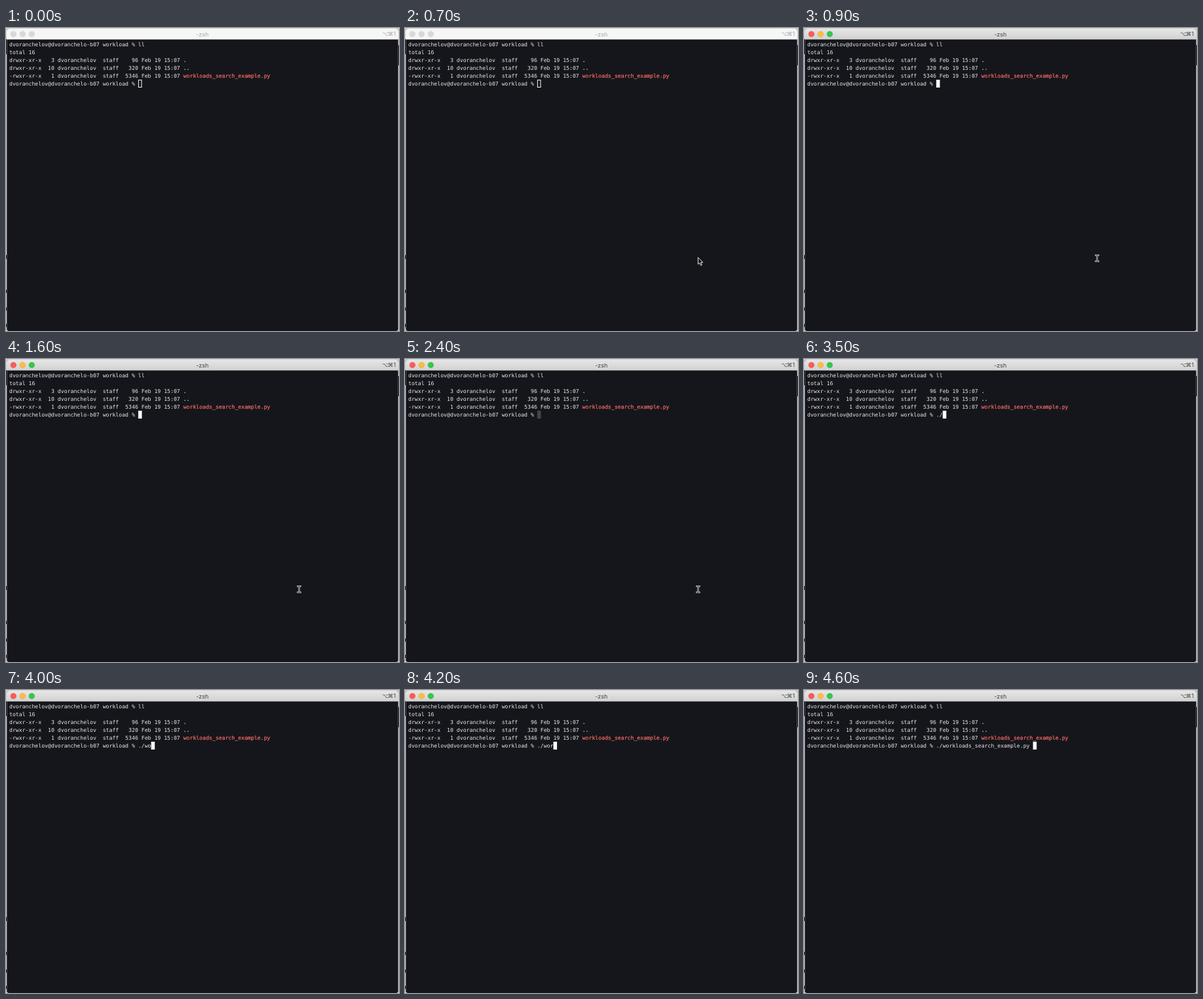
These frames come from a looping animation (600 by 463 pixels, 5000 ms). An HTML page:

```html
<!DOCTYPE html>
<html lang="en">
<head>
<meta charset="utf-8">
<title>Terminal</title>
<style>
html, body { margin: 0; width: 100%; height: 100%; overflow: hidden; background: #15161b; }
svg { display: block; width: 600px; height: 463px; }
text { white-space: pre; text-rendering: geometricPrecision; }
#lines text { font: 8.18px "DejaVu Sans Mono", monospace; fill: #e9e9ea; }
.bar { font: 9px Inter, sans-serif; text-anchor: middle; fill: #404040; }
.key { font: 8.3px "DejaVu Sans", sans-serif; }
.exe { fill: #f16a66; stroke: #f16a66; stroke-width: .22; }
.dir { fill: #a8e4e2; stroke: #a8e4e2; stroke-width: .22; }
.idle .bar { fill: #a6a6a6; }
.idle #lights circle { fill: #d9d9d9; stroke: #cacaca; }
.idle #title { fill: #f6f6f6; }
</style>
</head>
<body>
<svg id="stage" viewBox="0 0 600 463">
  <defs>
    <linearGradient id="chrome" x2="0" y2="1">
      <stop stop-color="#e6e6e6"/><stop offset="1" stop-color="#d1d1d1"/>
    </linearGradient>
  </defs>
  <rect width="600" height="463" fill="#d2d2d3"/>
  <g fill="#1b1b1d">
    <rect y="17" width="1" height="23"/>
    <rect x="599" y="26" width="1" height="31"/>
    <rect y="347" width="1" height="6"/>
    <rect y="400" width="1" height="5"/>
    <rect y="427" width="1" height="5"/>
    <rect y="452" width="1" height="5"/>
  </g>
  <rect x="1" y="1" width="598" height="462" rx="4" fill="#15161b"/>
  <path d="M1.5 17V460M598.5 17V460" stroke="#4b4c50"/>
  <path id="title" d="M1 17.5V5q0-4 4-4H595q4 0 4 4V17.5z" fill="url(#chrome)"/>
  <g id="lights" stroke-width=".5">
    <circle cx="11.3" cy="9.3" r="4.3" fill="#fc5b57" stroke="#df4744"/>
    <circle cx="25.3" cy="9.3" r="4.3" fill="#fdbc40" stroke="#de9f34"/>
    <circle cx="39.3" cy="9.3" r="4.3" fill="#34c84a" stroke="#27aa35"/>
  </g>
  <text class="bar" x="299.8" y="12.6">-zsh</text>
  <text class="bar key" x="579.2" y="12.2">⌥</text>
  <text class="bar key" x="587.2" y="12.2">⌘</text>
  <text class="bar" x="593.4" y="12.4">1</text>
  <g id="lines"></g>
  <rect id="cursor" y="79.5" width="4.6" height="11" stroke="#fff"/>
  <path id="arrow" d="M0 0V10.4L2.4 8.3 4.1 12.2 5.9 11.4 4.2 7.6H7.4z" fill="#111" stroke="#fff" stroke-width=".9"/>
  <g id="beam" fill="none" stroke-linecap="square">
    <path d="M445.4 347.2H449.6M447.5 347.2V356.6M445.4 356.6H449.6" stroke="#fff" stroke-width="2"/>
    <path d="M445.6 347.2H449.4M447.5 347.2V356.6M445.6 356.6H449.4" stroke="#15161b" stroke-width=".7"/>
  </g>
</svg>
<script>
const $ = id => document.getElementById(id);
const LOOP = 5000, LEFT = 5, CELL = 8.18 * 0.602;
const USER = 'dvoranchelov', SCRIPT = 'workloads_search_example.py';
const PROMPT = USER + '@dvoranchelo-b07 workload % ';
const COMMAND = './' + SCRIPT + ' ';

// Times at which the number of typed characters changes; the last is a tab completion.
const KEYS = [[3200, 1], [3500, 2], [3900, 3], [4000, 4], [4100, 5], [4300, 6], [4500, COMMAND.length]];
// Cursor opacity for each tenth of its one-second blink.
const BLINK = [0.97, 0.45, 0, 0, 0.2, 0.65, 1, 1, 1, 1];

function addLine(row, text, tail = '', kind = '') {
  const line = document.createElementNS('http://www.w3.org/2000/svg', 'text');
  line.setAttribute('x', LEFT);
  line.setAttribute('y', 27.7 + row * 12);
  line.innerHTML = `${text}<tspan class="${kind}">${tail}</tspan>`;
  $('lines').append(line);
  return line;
}

const entry = (mode, links, size) =>
  `${mode} ${String(links).padStart(3)} ${USER}  staff  ${String(size).padStart(4)} Feb 19 15:07 `;

addLine(0, PROMPT + 'll');
addLine(1, 'total 16');
addLine(2, entry('drwxr-xr-x', 3, 96), '.', 'dir');
addLine(3, entry('drwxr-xr-x', 10, 320), '..', 'dir');
addLine(4, entry('-rwxr-xr-x', 1, 5346), SCRIPT, 'exe');
const input = addLine(5, PROMPT).lastChild;

const show = (id, on) => $(id).setAttribute('visibility', on ? 'visible' : 'hidden');

function draw(now) {
  const t = Math.floor(now % LOOP / 100) * 100;
  const active = t >= 900;
  const typed = KEYS.reduce((n, [at, count]) => t >= at ? count : n, 0);

  $('stage').setAttribute('class', active ? '' : 'idle');
  input.textContent = COMMAND.slice(0, typed);

  const cursor = $('cursor');
  cursor.setAttribute('x', LEFT + (PROMPT.length + typed) * CELL + 0.4);
  cursor.setAttribute('fill', active ? '#fff' : 'none');
  cursor.setAttribute('opacity', active && !typed ? BLINK[t % 1000 / 100] : 1);

  const rest = (1 - Math.min(1, Math.max(0, (t - 300) / 400))) ** 2;
  $('arrow').setAttribute('transform', `translate(${447.4 - 7 * rest} ${350.6 + 24 * rest})`);
  show('arrow', t >= 300 && !active);
  show('beam', active && !typed);
}

const start = performance.now();
function tick() {
  draw(performance.now() - start);
  requestAnimationFrame(tick);
}
tick();
</script>
</body>
</html>
```
